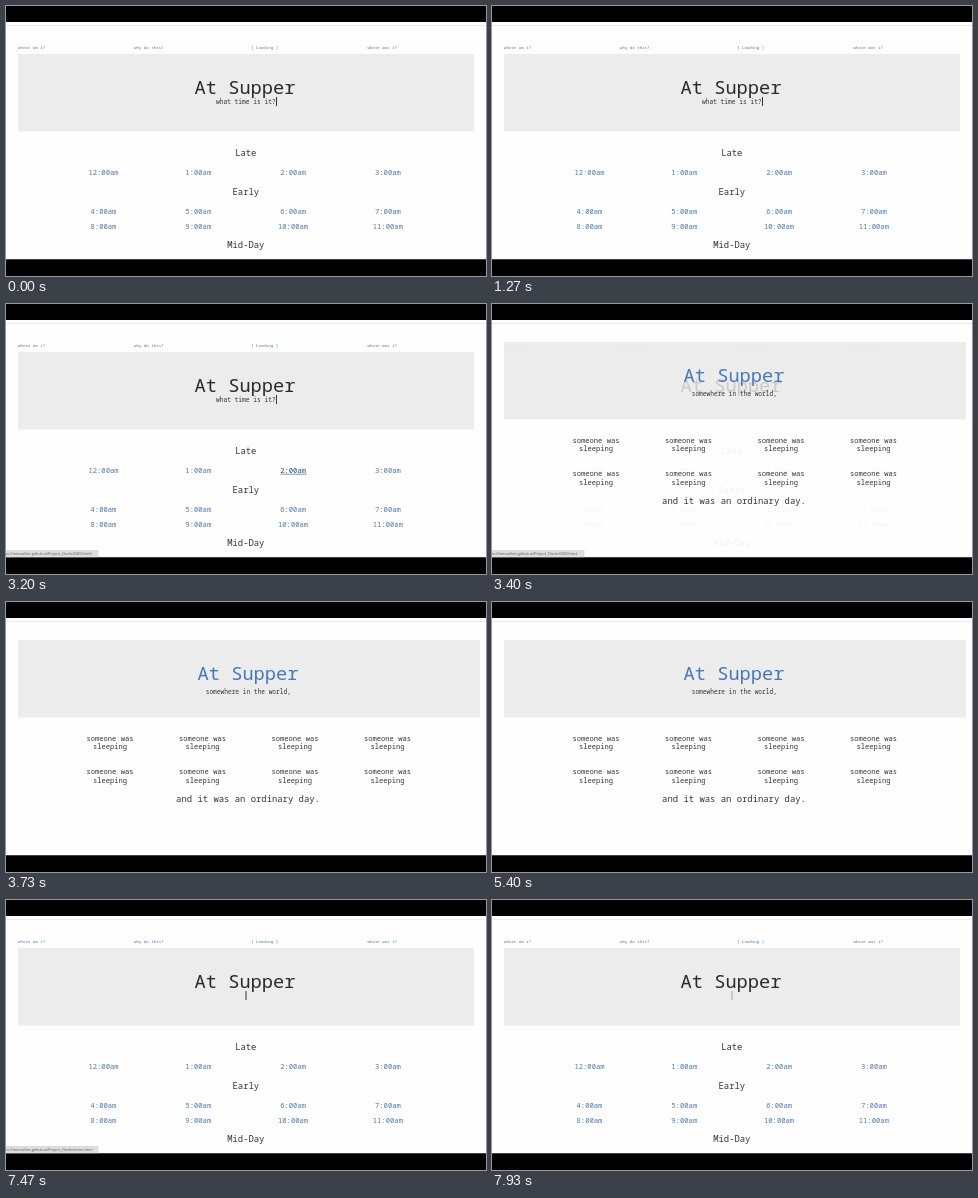
Recreate the animation shown at these times as an HTML page. Size 480 px wide and 270 px high, loop 8 s.

```html
<!DOCTYPE html>
<html lang="en">
<head>
<meta charset="utf-8">
<title>What time is it?</title>
<style>
html, body { margin: 0; height: 100%; overflow: hidden; background: #000; }
svg { display: block; width: 100vw; height: 100vh; }
text { font-family: "Noto Sans Mono", "DejaVu Sans Mono", monospace; white-space: pre; }
.mid { text-anchor: middle; }
.status { font-family: "Open Sans", Arial, sans-serif; }
</style>
</head>
<body>
<svg viewBox="0 0 480 270">
  <rect y="16" width="480" height="237.5" fill="#fefefe"/>
  <rect y="19" width="480" height="1" fill="#ececec"/>
  <rect id="banner" x="12" height="77.5" fill="#ececec"/>
  <g id="clock"></g>
  <g id="story"></g>
  <rect id="caret" y="91" width="1" height="9" fill="#333"/>
  <g id="status">
    <rect x="-1" y="246.5" width="93" height="7" fill="#dedede" stroke="#c8c8c8" stroke-width=".5"/>
    <text class="status" id="address" x="-1" y="251.3" font-size="3.7" fill="#555"></text>
  </g>
  <rect y="253.5" width="480" height="16.5"/>
</svg>
<script>
const LOOP = 8000, BLINK = 650;
const OPEN = 3400, BACK = 7470;
const INK = '#333', LINK = '#4d78b5', TITLE = 'At Supper';
const $ = id => document.getElementById(id);

function add(parent, tag, attrs, content = '') {
  const el = document.createElementNS('http://www.w3.org/2000/svg', tag);
  for (const key in attrs) el.setAttribute(key, attrs[key]);
  el.textContent = content;
  return parent.appendChild(el);
}
const label = (parent, content, x, y, size, fill = INK, extra = {}) =>
  add(parent, 'text', { x, y, 'font-size': size, fill, class: 'mid', ...extra }, content);

// Page with the list of hours
const clock = $('clock');
const rest = add(clock, 'g', {});
[['where am i?', 12], ['why do this?', 128], ['[ Loading ]', 245], ['where was i?', 361.5]]
  .forEach(([s, x]) => label(rest, s, x, 42.8, 4.12, '#5c78ad', { class: '' }));
const heading = label(clock, TITLE, 239, 88, 18.7, '#2b2b2b', { 'font-weight': 300 });
const prompt = label(clock, 'what time is it?', 239.8, 97.7, 6.22);
[['Late', 150], ['Early', 188.7], ['Mid-Day', 242.2]]
  .forEach(([s, y]) => label(rest, s, 239.8, y, 8.9));
const hours = [];
for (let h = 0; h < 12; h++)
  hours.push(label(rest, `${h || 12}:00am`, 97.5 + h % 4 * 94.8,
    [169, 207.5, 222.7][h >> 2], 7.2, LINK));
const hourLine = add(rest, 'rect', { x: 274.5, y: 169.8, width: 26, height: .6, fill: '#23527c' });

// Page behind the chosen hour
const story = $('story');
const home = label(story, TITLE, 242, 78, 18.7, LINK, { 'font-weight': 300 });
const homeLine = add(story, 'rect', { x: 193, y: 79.3, width: 100, height: 1.2, fill: '#23527c' });
label(story, 'somewhere in the world,', 242.3, 92.4, 6.18);
for (let i = 0; i < 8; i++) {
  const x = 104 + i % 4 * 92.5, y = i < 4 ? 138.6 : 171.9;
  label(story, 'someone was', x, y, 7.1);
  label(story, 'sleeping', x, y + 8.7, 7.1);
}
label(story, 'and it was an ordinary day.', 242, 200.3, 8.9);

const ramp = (t, a, b) => Math.max(0, Math.min(1, (t - a) / (b - a)));
const mix = (a, b, k) => `rgb(${a.map((v, i) => Math.round(v + (b[i] - v) * k))})`;
const hover = k => mix([67, 122, 190], [35, 75, 130], k);
const fade = (el, v) => el.setAttribute('opacity', v);

function draw(t) {
  const reading = t >= OPEN && t < BACK, returned = t >= BACK;
  const banner = $('banner');
  banner.setAttribute('y', reading ? 38 : 48);
  banner.setAttribute('width', reading ? 462 : 456);

  // The old page leaves a short ghost
  const ghost = 1 - ramp(t, OPEN, OPEN + 330);
  fade(heading, reading ? .17 * ghost : 1);
  fade(rest, reading ? .06 * ghost : 1);
  fade(prompt, reading || returned ? 0 : 1);
  fade(story, reading ? 1 : 0);

  const overHour = returned ? 0 : ramp(t, 2640, 2840);
  hours[2].setAttribute('fill', mix([77, 120, 181], [35, 82, 124], overHour));
  fade(hourLine, overHour);
  const overHome = ramp(t, 6600, 6800);
  home.setAttribute('fill', hover(overHome));
  fade(homeLine, overHome);

  const phase = (returned ? t - BACK : t) / BLINK;
  const caret = $('caret');
  caret.setAttribute('x', returned ? 239.5 : 270);
  fade(caret, reading ? 0 : .5 + .5 * Math.cos(2 * Math.PI * phase));

  const first = ramp(t, 3000, 3200) * (1 - ramp(t, 3500, 3700));
  const second = ramp(t, 6930, 7070) * (1 - ramp(t, 7600, 7800));
  fade($('status'), Math.max(first, second));
  $('address').textContent = 'ps://mirovellan.github.io/Project_Clocks/' +
    (t < 5000 ? '0200.html' : 'index.html');
}

function tick() {
  draw(performance.now() % LOOP);
  requestAnimationFrame(tick);
}
tick();
</script>
</body>
</html>
```
